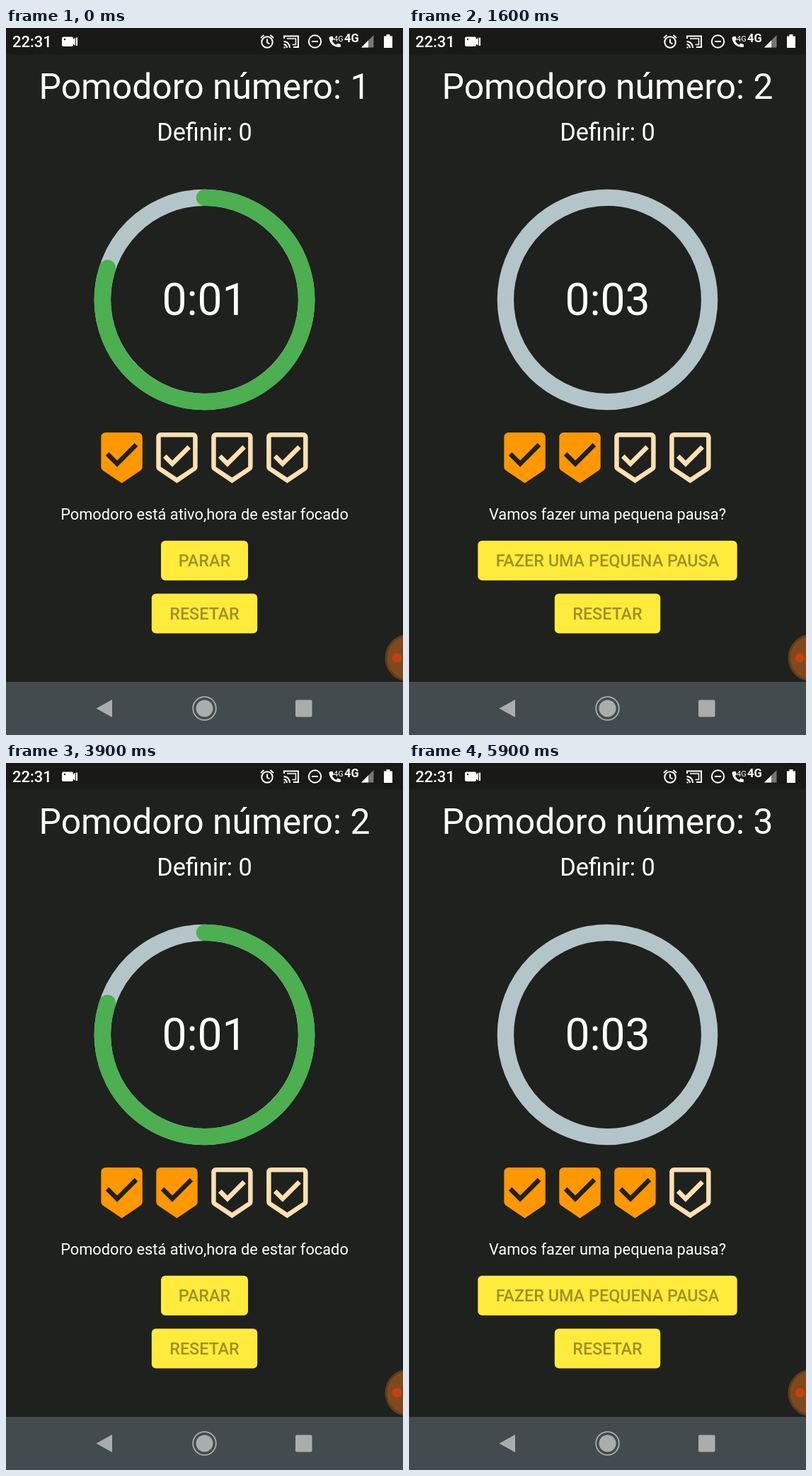
Write an HTML page that moves like this. It is 561x998 px and loops after 6100 ms.

```html
<!DOCTYPE html>
<html lang="pt">
<head>
<meta charset="utf-8">
<style>
html, body { margin: 0; width: 100%; height: 100%; overflow: hidden; background: #1f211e; }
svg { display: block; width: 561px; height: 998px; }
text { font-family: Roboto, "Noto Sans", sans-serif; fill: #fff; }
.mid text { text-anchor: middle; }
.mid .label { font-weight: 500; font-size: 23.4px; fill: #9e9225; }
.btn { fill: #ffeb3b; }
</style>
</head>
<body>
<svg viewBox="0 0 561 998">
  <defs>
    <path id="full" fill="#ff9800" d="M19 1H5c-1.1 0-1.99.9-1.99 2L3 15.93c0 .69.35 1.3.88 1.66L12 23l8.11-5.41c.53-.36.88-.97.88-1.66L21 3c0-1.1-.9-2-2-2zm-9 15l-5-5 1.41-1.41L10 13.17l7.59-7.59L19 7l-9 9z"/>
    <path id="open" fill="#ffe0b2" d="M19 1H5c-1.1 0-1.99.9-1.99 2L3 15.93c0 .69.35 1.3.88 1.66L12 23l8.11-5.41c.53-.36.88-.97.88-1.66L21 3c0-1.1-.9-2-2-2zm-7 19.6l-7-4.66V3h14v12.93l-7 4.67zm-2.01-7.42l-2.58-2.59L6 12l4 4 8-8-1.42-1.42z"/>
  </defs>
  <rect width="561" height="998" fill="#1f211e"/>

  <!-- status bar -->
  <rect width="561" height="37.5" fill="#191a18"/>
  <text x="9" y="27" font-size="22" font-weight="500">22:31</text>
  <g fill="#fff">
    <rect x="79" y="12.5" width="16" height="13.5" rx="2"/>
    <path d="M94 17L98 13.5V25L94 21.5zM99 13.5h2v11.5h-2z"/>
    <circle cx="83" cy="16" r="1.2" fill="#191a18"/>
    <path d="M534 11.5h3.5V9h5v2.5h3.5V28h-12z"/>
    <path d="M519.500 10V27.500H502z" fill="#777"/>
    <path d="M512 17.500V27.500H502z"/>
    <path d="M458 12l3.500-.3 1.600 4.300-2.200 2.200q2 3.800 5.600 5.600l2.200-2.200 4.300 1.600-.3 3.800Q458 27.500 456.500 13.500z"/>
  </g>
  <g fill="none" stroke="#fff" stroke-width="2">
    <circle cx="369" cy="20" r="7.700"/>
    <path d="M369 15.500v5l3.500 2M360 14l4.500-4M378 14l-4.500-4"/>
    <path d="M393 15v-3.500h20V27h-7M392.500 27.500h2M392.500 23q4 .5 4.500 5M392.500 19q8 .5 8.500 9"/>
    <path d="M397 15h12.500v8.500h-5" stroke-width="1.500"/>
    <circle cx="436.500" cy="19" r="8.700"/>
    <path d="M432 19h9"/>
  </g>
  <text x="463" y="19" font-size="11">4G</text>
  <text x="478" y="20" font-size="16.500" font-weight="700">4G</text>

  <g class="mid">
    <text id="title" x="280.500" y="100" font-size="49.870"></text>
    <text x="280.500" y="159" font-size="34.280">Definir: 0</text>
    <g fill="none" stroke-width="23.400">
      <circle cx="280.500" cy="383.500" r="144.100" stroke="#b3c5c9"/>
      <path id="arc" stroke="#4caf50" stroke-linecap="round"/>
    </g>
    <text id="clock" x="280.500" y="405" font-size="62.330"></text>
    <g id="badges"></g>
    <text id="status" x="280.500" y="694" font-size="21.820"></text>
    <rect id="action" class="btn" y="723.700" height="56" rx="6"/>
    <text id="actionLabel" class="label" x="280.500" y="760"></text>
    <rect class="btn" x="205.800" y="798.400" width="149.400" height="56" rx="6"/>
    <text class="label" x="280.500" y="834.700">RESETAR</text>
  </g>

  <!-- floating bubble -->
  <circle cx="569" cy="889" r="32" fill="#81491a" stroke="#5e3c1d" stroke-width="3"/>
  <circle cx="552.500" cy="889" r="6.800" fill="#c2410f"/>

  <!-- navigation bar -->
  <rect y="923" width="561" height="75" fill="#434b4e"/>
  <g fill="#a9adae">
    <path d="M127.500 960.500L150 948V973z"/>
    <circle cx="280.500" cy="960.500" r="12"/>
    <circle cx="280.500" cy="960.500" r="16.300" fill="none" stroke="#a9adae" stroke-width="1.800"/>
    <rect x="409" y="948.500" width="23.500" height="24" rx="2"/>
  </g>
</svg>
<script>
const LOOP = 6100, WORK_TIME = 5;
const el = id => document.getElementById(id);

// [start ms, pomodoro number, seconds left, working]
const states = [
  [0, 1, 1, true],
  [600, 1, 0, true],
  [1600, 2, 3, false],
  [2700, 2, 2, true],
  [3700, 2, 1, true],
  [4700, 2, 0, true],
  [5700, 3, 3, false]
];

function arcPath(part) {
  const cx = 280.5, cy = 383.5, r = 144.1;
  if (part <= 0) return "";
  const point = a => `${cx + r * Math.sin(a)} ${cy - r * Math.cos(a)}`;
  const end = 2 * Math.PI * part, half = end / 2;
  const step = a => `A${r} ${r} 0 0 1 ${point(a)}`;
  return `M${point(0)}${step(half)}${step(end)}`;
}

function badge(i, done) {
  const scale = 3.247;
  return `<use href="#${done ? "full" : "open"}" transform="translate(${124.6 + i * 24 * scale} 567.7) scale(${scale})"/>`;
}

let shown;
function draw(t) {
  const state = states.filter(s => s[0] <= t).pop();
  if (state === shown) return;
  shown = state;
  const [, number, left, working] = state;
  el("title").textContent = "Pomodoro número: " + number;
  el("clock").textContent = "0:0" + left;
  el("arc").setAttribute("d", arcPath(working ? 1 - left / WORK_TIME : 0));
  el("badges").innerHTML = [0, 1, 2, 3].map(i => badge(i, i < number)).join("");
  el("status").textContent = working
    ? "Pomodoro está ativo,hora de estar focado"
    : "Vamos fazer uma pequena pausa?";
  el("actionLabel").textContent = working ? "PARAR" : "FAZER UMA PEQUENA PAUSA";
  const width = working ? 123 : 366.4;
  el("action").setAttribute("x", 280.5 - width / 2);
  el("action").setAttribute("width", width);
}

const start = performance.now();
function frame() {
  draw((performance.now() - start) % LOOP);
  requestAnimationFrame(frame);
}
frame();
</script>
</body>
</html>
```
